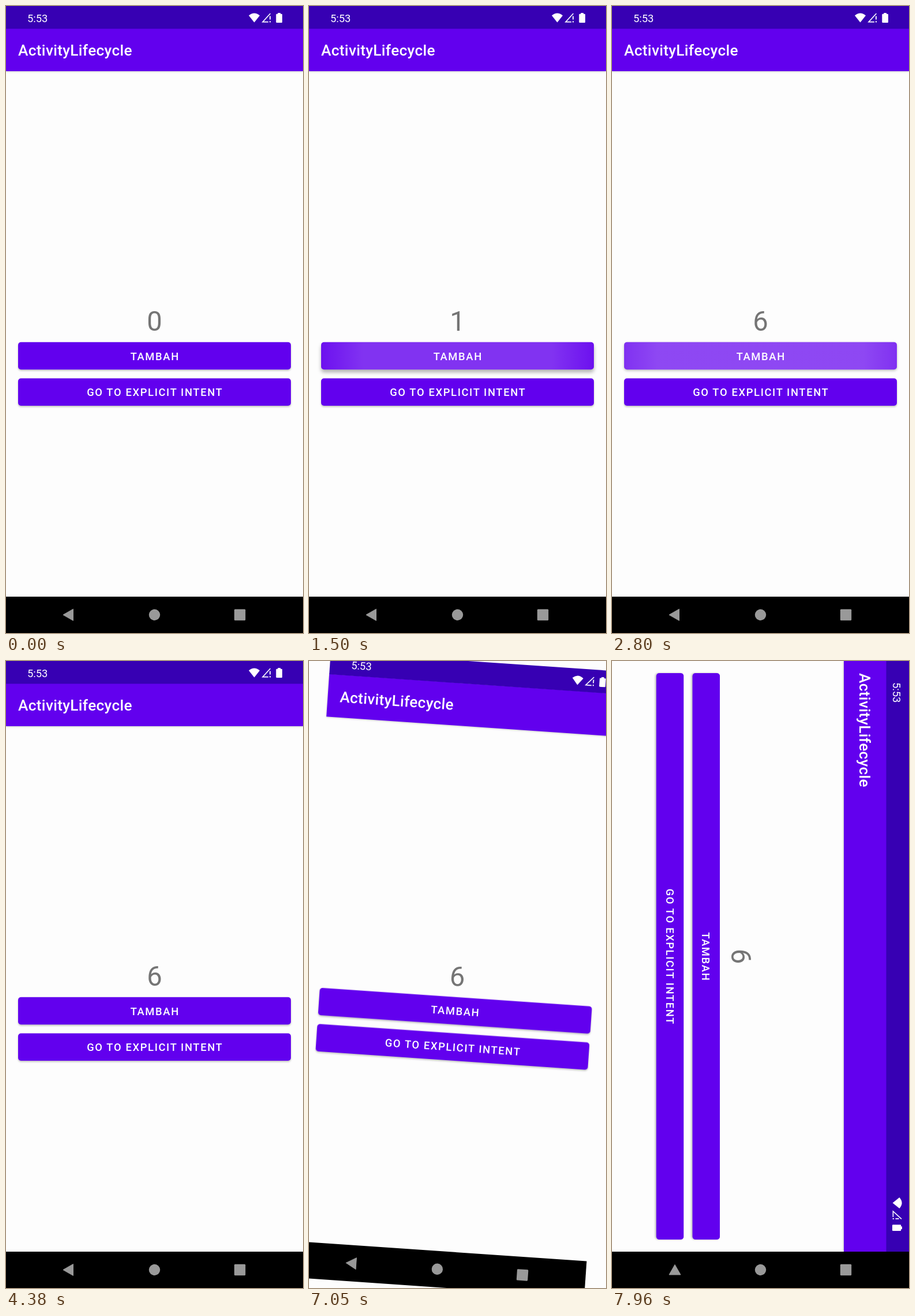
These frames come from a looping animation (515x1087 px, 8 s). An HTML page:

```html
<!DOCTYPE html>
<html lang="id">
<head>
<meta charset="utf-8">
<title>ActivityLifecycle</title>
<style>
  html, body { margin: 0; width: 100%; height: 100%; overflow: hidden; background: #fdfdfd; }
  svg { display: block; width: 515px; height: 1087px; }
  text { font-family: Roboto, sans-serif; fill: #fff; }
  .clock { font-size: 18.36px; }
  .title { font-size: 26.2px; font-weight: 500; letter-spacing: .0125em; }
  .label { font-size: 18.36px; font-weight: 500; letter-spacing: .0893em; text-anchor: middle; }
  .count { font-size: 47.2px; fill: #757575; text-anchor: middle; }
  .bar { fill: #6200ee; filter: drop-shadow(0 1px 1.5px rgba(0,0,0,.2)); }
  .button { fill: #6200ee; filter: drop-shadow(0 2px 1.5px rgba(0,0,0,.24)); }
  .nav { fill: #999; }
</style>
</head>
<body>
<svg id="stage" viewBox="0 0 515 1087">
  <defs id="defs"></defs>
  <g id="portrait"></g>
  <g id="landscape"></g>
</svg>
<script>
const LOOP = 8000;
const CX = 257.5, CY = 543.5;
const PRESSES = [1290, 1560, 1820, 2070, 2320, 2560];
const COUNT_DELAY = 150;
const TURN = { start: 7014, firstFrame: 7050, end: 7300, step: 250 / 6 };

const $ = id => document.getElementById(id);
const clamp = v => Math.max(0, Math.min(1, v));

function statusIcons(dx) {
  return `<g transform="translate(${dx} 0)" fill="#fff">
    <path d="M421 16.6Q430.5 8.2 440 16.6L430.5 28.4Z"/>
    <path d="M458.4 13L445 27.6H455" fill="none" stroke="#fff" stroke-width="1.6"/>
    <path d="M457 17.5h1.8v6h-1.8zM457 26h1.8v2.4h-1.8z"/>
    <rect x="468.3" y="13.8" width="10.7" height="15.2" rx="1.2"/>
    <rect x="471.3" y="12" width="4.7" height="3"/>
  </g>`;
}

function button(w, y, label, extra = "") {
  return `<rect class="button" x="21" y="${y}" width="${w - 42}" height="47.4" rx="5"/>${extra}
    <text class="label" x="${w / 2 + .8}" y="${y + 30.7}">${label}</text>`;
}

function navIcons([back, home, recent]) {
  const [bx, by] = back, [hx, hy] = home, [rx, ry] = recent;
  return `<g class="nav">
    <path d="M${bx - 9} ${by}L${bx + 8.5} ${by - 10}V${by + 10}Z" stroke="#999" stroke-linejoin="round"/>
    <circle cx="${hx}" cy="${hy}" r="9.7"/>
    <rect x="${rx - 9.7}" y="${ry - 9.7}" width="19.4" height="19.4" rx="1.5"/>
  </g>`;
}

// w is the width left for the app, dy moves the centred content
function screen({ w, dy, full, navRect, icons, ripples }) {
  return `<rect width="${full[0]}" height="${full[1]}" fill="#fdfdfd"/>
    <rect class="bar" y="39" width="${w}" height="74"/>
    <rect width="${w}" height="39.5" fill="#3700b3"/>
    <text class="clock" x="37" y="27.6">5:53</text>
    ${statusIcons(w - 515)}
    <text class="title" x="21" y="86.4">ActivityLifecycle</text>
    <text class="count" x="${w / 2}" y="${563.3 + dy}">6</text>
    ${button(w, 582.8 + dy, "TAMBAH", ripples)}
    ${button(w, 645.6 + dy, "GO TO EXPLICIT INTENT")}
    <rect x="${navRect[0]}" y="${navRect[1]}" width="${navRect[2]}" height="${navRect[3]}"/>
    ${navIcons(icons)}`;
}

$("defs").innerHTML = PRESSES.map((_, i) =>
  `<radialGradient id="glow${i}" gradientUnits="userSpaceOnUse" cx="${CX}" cy="606.5" r="1">
    <stop offset=".6" stop-color="#fff"/><stop offset="1" stop-color="#fff" stop-opacity="0"/>
  </radialGradient>`).join("");

$("portrait").innerHTML = screen({
  w: 515, dy: 0, full: [515, 1087], navRect: [0, 1024, 515, 63],
  icons: [[108, 1055.5], [CX, 1055.5], [405.5, 1055.5]],
  ripples: PRESSES.map((_, i) =>
    `<rect id="ripple${i}" x="21" y="582.8" width="473" height="47.4" rx="5" fill="url(#glow${i})"/>`).join("")
});
$("landscape").innerHTML = screen({
  w: 1024, dy: -254.8, full: [1087, 515], navRect: [1024, 0, 63, 515],
  icons: [[1055.5, 406], [1055.5, CX], [1055.5, 109.5]], ripples: ""
});

const count = $("portrait").querySelector(".count");
const addButton = $("portrait").querySelector(".button");

// cubic-bezier(.4, 0, .2, 1)
function fastOutSlowIn(x) {
  let lo = 0, hi = 1;
  for (let i = 0; i < 30; i++) {
    const s = (lo + hi) / 2, r = 1 - s;
    if (1.2 * r * r * s + .6 * r * s * s + s ** 3 < x) lo = s; else hi = s;
  }
  return 3 * (1 - lo) * lo * lo + lo ** 3;
}

function drawTaps(t) {
  let lift = 0;
  PRESSES.forEach((press, i) => {
    const age = t - press;
    const grow = 1 - (1 - clamp(age / 450)) ** 2;
    const fade = 1 - clamp((age - 300) / 375);
    $("glow" + i).setAttribute("r", 1 + 379 * grow);
    $("ripple" + i).setAttribute("opacity", .2 * clamp(age / 75) * fade);
    lift = Math.max(lift, Math.min(clamp(age / 100), 1 - clamp((age - 170) / 80)));
  });
  addButton.style.filter =
    `drop-shadow(0 ${2 + 7 * lift}px ${1.5 + 4 * lift}px rgba(0,0,0,${.24 + .1 * lift}))`;
  count.textContent = PRESSES.filter(p => t >= p + COUNT_DELAY).length;
}

function drawTurn(t) {
  const { start, firstFrame, end, step } = TURN;
  const ticks = Math.floor((t - firstFrame) / step + 1e-6);
  const now = t < firstFrame ? start : Math.min(end, firstFrame + ticks * step);
  const angle = 90 * fastOutSlowIn(clamp((now - start) / (end - start)));
  const turn = `rotate(${angle} ${CX} ${CY})`;
  $("portrait").setAttribute("transform", turn);
  $("portrait").setAttribute("opacity", 1 - clamp((now - firstFrame) / 116));
  $("landscape").setAttribute("transform", `${turn} translate(${CX - CY} ${CY - CX})`);
  $("landscape").setAttribute("opacity", clamp((now - 7110) / 160));
}

const begin = performance.now();
function frame() {
  const t = (performance.now() - begin) % LOOP;
  drawTaps(t);
  drawTurn(t);
  requestAnimationFrame(frame);
}
frame();
</script>
</body>
</html>
```
